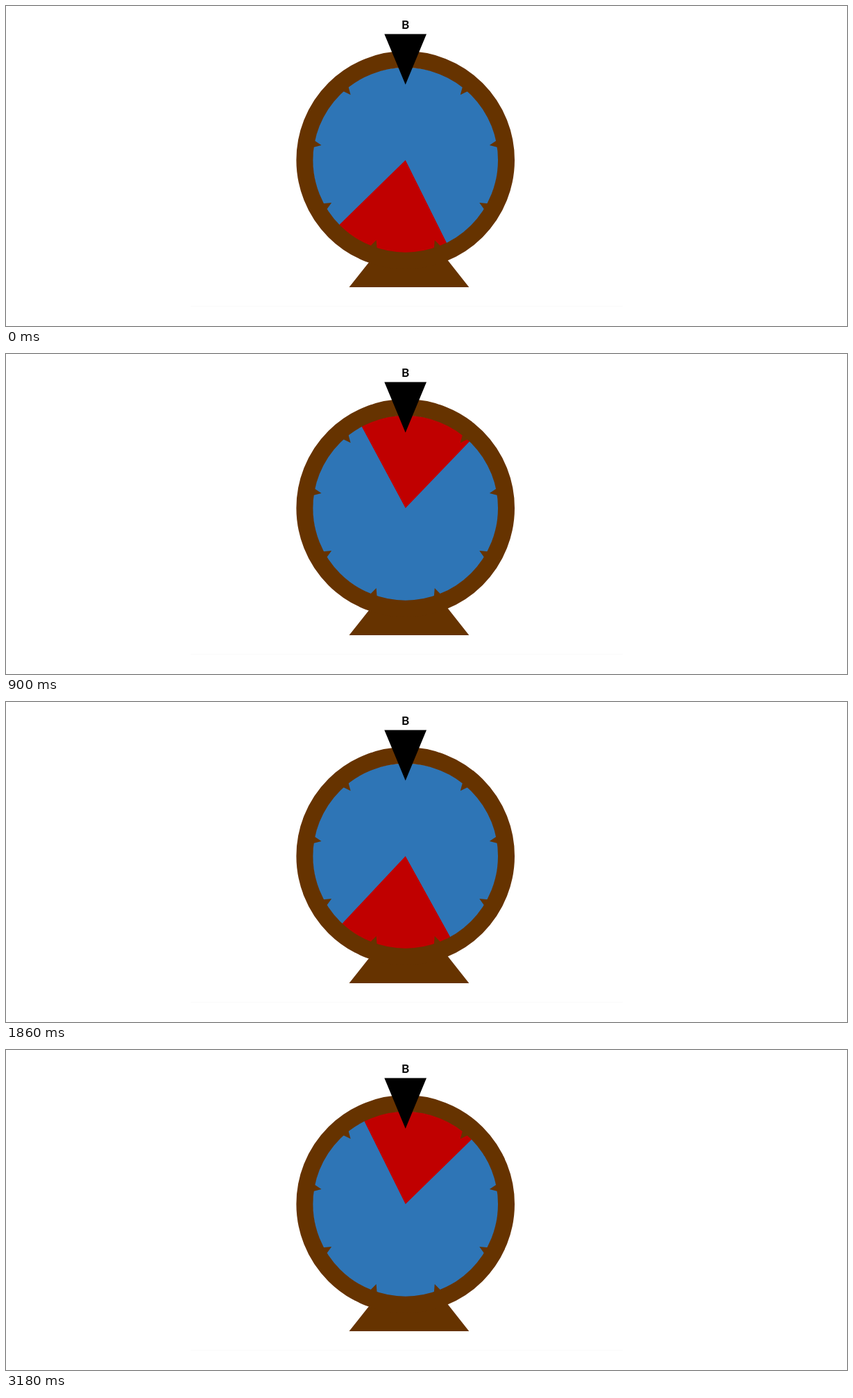
Animation of 1212x462 px, one loop 3.24 s. Source, as an HTML page:

```html
<!DOCTYPE html>
<html lang="en">
<head>
<meta charset="utf-8">
<title>Spinning wheel</title>
<style>
  html, body { margin: 0; width: 100%; height: 100%; overflow: hidden; background: #fff; }
  svg { display: block; width: 1212px; height: 462px; }
  text { font: bold 17px Lato, Carlito, sans-serif; text-anchor: middle; }
</style>
</head>
<body>
<svg viewBox="0 0 1212 462">
  <path d="M266 433.5H889" stroke="#fafafa"/>
  <path d="M494.5 406H667.3L635 365H527Z" fill="#663300"/>
  <g transform="translate(575.7 222.4)">
    <circle r="134" fill="#2e75b6"/>
    <path id="wedge" fill="#c00000"/>
    <circle r="145.3" fill="none" stroke="#663300" stroke-width="24"/>
    <path id="teeth" fill="#663300"/>
  </g>
  <path d="M545.3 40.5H606L575.7 113.5Z"/>
  <text x="575.5" y="33">B</text>
</svg>
<script>
  const STEP = 60, STEPS = 54;
  const wedge = document.getElementById('wedge');

  // Point at a clockwise angle from the top.
  const polar = (radius, degrees) => {
    const a = degrees * Math.PI / 180;
    return `${(radius * Math.sin(a)).toFixed(2)} ${(-radius * Math.cos(a)).toFixed(2)}`;
  };

  wedge.setAttribute('d', `M0 0L${polar(134, 153.6)}A134 134 0 0 1 ${polar(134, 225.6)}Z`);

  let teeth = '';
  for (let a = 0; a < 360; a += 40) {
    teeth += `M${polar(135, a - 2.3)}L${polar(123, a)}L${polar(135, a + 2.3)}Z`;
  }
  document.getElementById('teeth').setAttribute('d', teeth);

  // Steady spin, a slightly slower stretch, then braking to a stop at 540 degrees.
  function angleAt(n) {
    if (n <= 26) return n * 11.88;
    if (n <= 45) return 308.9 + (n - 26) * 9.72;
    return 540 - 46.4 * ((53 - n) / 8) ** 2;
  }

  const start = performance.now();
  function draw() {
    const n = Math.floor((performance.now() - start) / STEP) % STEPS;
    wedge.setAttribute('transform', `rotate(${angleAt(n)})`);
    requestAnimationFrame(draw);
  }
  draw();
</script>
</body>
</html>
```
